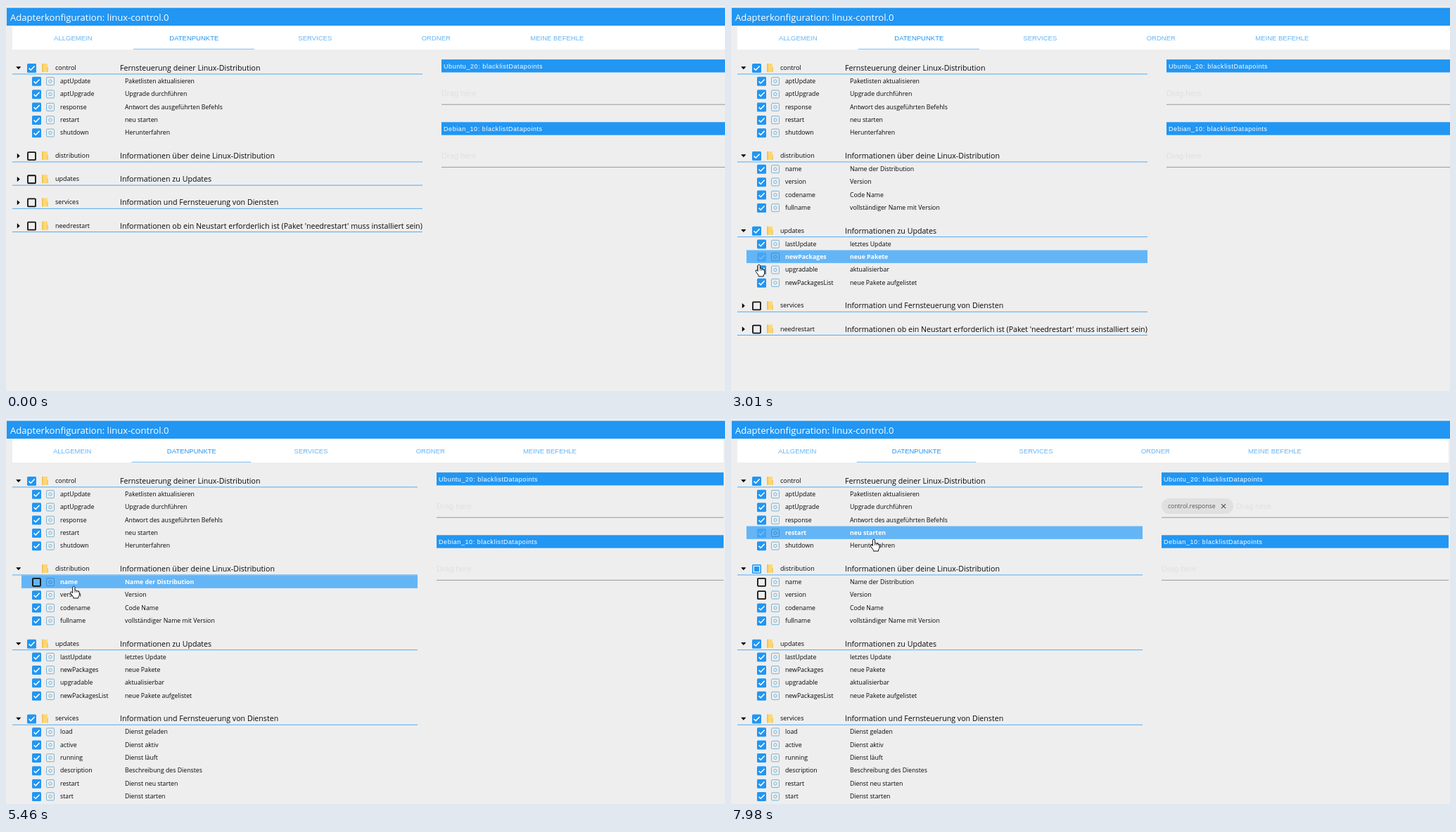
Animation of 1022 by 548 pixels, one loop 8000 ms. Source, as an HTML page with a canvas:

```html
<!DOCTYPE html>
<html lang="de">
<head>
<meta charset="utf-8">
<title>Adapterkonfiguration</title>
<style>
html, body { margin: 0; width: 100%; height: 100%; overflow: hidden; background: #eee; }
canvas { display: block; width: 1022px; height: 548px; }
</style>
</head>
<body>
<canvas id="stage"></canvas>
<script>
const W = 1022, H = 548, LOOP = 8000;
const BLUE = '#2196f3', LIGHT = '#64b5f6', INK = '#080808';
const SANS = '"Open Sans", "Noto Sans", sans-serif';
const ARIAL = '"Liberation Sans", Arial, sans-serif';
const ROW = 18.37, GROUP = 33.2, HALF = 9.4;
const PRESS = 70, LAG = 70, UNFOLD = 160;

const canvas = document.getElementById('stage');
const ctx = canvas.getContext('2d');
const dpr = window.devicePixelRatio || 1;
canvas.width = W * dpr;
canvas.height = H * dpr;

// checked: when a group is ticked; off: when a row is unticked
const groups = [
  { name: 'control', text: 'Fernsteuerung deiner Linux-Distribution', checked: -UNFOLD, rows: [
    ['aptUpdate', 'Paketlisten aktualisieren'], ['aptUpgrade', 'Upgrade durchführen'],
    ['response', 'Antwort des ausgeführten Befehls'], ['restart', 'neu starten'],
    ['shutdown', 'Herunterfahren']] },
  { name: 'distribution', text: 'Informationen über deine Linux-Distribution', checked: 1520, rows: [
    ['name', 'Name der Distribution', 5460], ['version', 'Version', 5940],
    ['codename', 'Code Name'], ['fullname', 'vollständiger Name mit Version']] },
  { name: 'updates', text: 'Informationen zu Updates', checked: 2540, rows: [
    ['lastUpdate', 'letztes Update'], ['newPackages', 'neue Pakete'],
    ['upgradable', 'aktualisierbar'], ['newPackagesList', 'neue Pakete aufgelistet']] },
  { name: 'services', text: 'Information und Fernsteuerung von Diensten', checked: 3620, rows: [
    ['load', 'Dienst geladen'], ['active', 'Dienst aktiv'], ['running', 'Dienst läuft'],
    ['description', 'Beschreibung des Dienstes'], ['restart', 'Dienst neu starten'],
    ['start', 'Dienst starten'], ['stop', 'Dienst stoppen']] },
  { name: 'needrestart', text: "Informationen ob ein Neustart erforderlich ist (Paket 'needrestart' muss installiert sein)",
    checked: Infinity, rows: [] }
].map(g => ({ ...g, rows: g.rows.map(([name, text, off = Infinity]) => ({ name, text, off })) }));

const toggles = groups.flatMap(g => [g.checked, ...g.rows.map(r => r.off)]);
const overflowAt = groups[3].checked + UNFOLD;
const drag = { start: 6650, end: 7500 };

// The pointer rests between moves; each visit starts at a point and makes moves to x, y
const visits = [
  { from: 120, to: 580, x: 876, y: 530, moves: [
    { t: 120, end: 580, x: 14, y: 240 }] },
  { from: 810, to: LOOP, x: 15, y: 211, moves: [
    { t: 1130, end: 1280, x: 37, y: 211 },
    { t: 1690, end: 2150, x: 57, y: 315 },
    { t: 2150, end: 2300, x: 42, y: 318 },
    { t: 2640, end: 3450, x: 37, y: 427 },
    { t: 3770, end: 4160, x: 44, y: 463 },
    { t: 4160, end: 4540, x: 48, y: 474 },
    { t: 4630, end: 5160, x: 97, y: 233 },
    { t: 5390, end: 5700, x: 94, y: 255 },
    { t: 6110, end: 6420, x: 98, y: 148 },
    { t: 6650, end: 6810, x: 188, y: 152 },
    { t: 6810, end: 7270, x: 660, y: 120 },
    { t: 7500, end: 7980, x: 203, y: 171 }] }
];

const hand = new Path2D('M-1.6 1.2Q0-.9 1.6 1.2V6Q3 5 4 6.5Q5.5 5.8 6.3 7.3Q8 6.8 8 8.8V12' +
  'Q8 14 6.5 15V17H-.5V15.5L-4 10.8Q-5.5 8.8-4.2 8Q-3 7.4-1.6 9.6Z');

const isDragging = t => t >= drag.start && t < drag.end;
const isPressed = t => isDragging(t) || toggles.some(c => t >= c - PRESS && t < c);

function pointerAt(t) {
  const visit = visits.find(v => t >= v.from && t < v.to);
  if (!visit) return null;
  let { x, y } = visit;
  for (const m of visit.moves) {
    const k = Math.min(1, Math.max(0, (t - m.t) / (m.end - m.t)));
    x += (m.x - x) * k;
    y += (m.y - y) * k;
  }
  return { x, y };
}

function rect(x, y, w, h, color) {
  ctx.fillStyle = color;
  ctx.fillRect(x, y, w, h);
}

function roundRect(x, y, w, h, r) {
  ctx.beginPath();
  ctx.roundRect(x, y, w, h, r);
}

function text(str, x, y, size, color, { bold = false, font = SANS, align = 'left', spacing = 0 } = {}) {
  ctx.font = `${bold ? 700 : 400} ${size}px ${font}`;
  ctx.letterSpacing = spacing + 'px';
  ctx.textAlign = align;
  ctx.fillStyle = color;
  ctx.fillText(str, x, y);
}

function trace(points) {
  ctx.beginPath();
  points.forEach(([x, y]) => ctx.lineTo(x, y));
}

function line(points, color, width) {
  trace(points);
  ctx.strokeStyle = color;
  ctx.lineWidth = width;
  ctx.stroke();
}

function arrow(x, y, open) {
  ctx.save();
  ctx.translate(x, y);
  if (open) ctx.rotate(Math.PI / 2);
  trace([[-2, -3.6], [2, 0], [-2, 3.6]]);
  ctx.fillStyle = '#000';
  ctx.fill();
  ctx.restore();
}

// state: 'on', 'off', 'part' or 'none'
function checkbox(x, y, state, hot) {
  if (state === 'none') return;
  if (state === 'off') {
    roundRect(x + 1, y - 5, 11, 11, 1);
    ctx.strokeStyle = '#111';
    ctx.lineWidth = 1.8;
    ctx.stroke();
    return;
  }
  roundRect(x, y - 6, 13, 13, 1.5);
  ctx.fillStyle = hot ? '#43a5f4' : BLUE;
  ctx.fill();
  if (state === 'part') {
    ctx.strokeStyle = '#fff';
    ctx.lineWidth = 1.2;
    ctx.strokeRect(x + 2.2, y - 3.8, 8.6, 8.6);
  } else {
    line([[x + 2.6, y + .6], [x + 5.2, y + 3.2], [x + 10.6, y - 2.4]], hot ? '#78bdf7' : '#fff', 1.5);
  }
}

function folder(y) {
  rect(51, y - 6, 8, 12, '#ffd873');
  rect(51, y - 6, 2, 12, '#f2c55c');
  rect(58, y - 1, 2, 7, '#f7cd66');
}

function stateIcon(x, y, hot) {
  ctx.strokeStyle = hot ? '#3f8fce' : '#78b4d8';
  ctx.lineWidth = 1;
  roundRect(x + .5, y - 5.2, 11, 11, 1.5);
  ctx.stroke();
  ctx.beginPath();
  ctx.arc(x + 6, y + .3, 2.2, 0, 7);
  ctx.stroke();
}

function groupState(g, t) {
  if (t < g.checked) return 'off';
  const changed = Math.min(...g.rows.map(r => r.off));
  if (t < changed) return 'on';
  return t < changed + PRESS ? 'none' : 'part';
}

function drawTree(t, right) {
  const p = pointerAt(isDragging(t) ? drag.start : t - LAG);

  // Fills the row if the pointer is on it and returns its text style
  function highlight(left, y) {
    const hot = !!p && p.x >= left && p.x < right && Math.abs(p.y - y) < HALF;
    if (hot) rect(left, y - HALF, right - left, 2 * HALF - .4, LIGHT);
    return { hot, ink: hot ? '#fff' : INK, style: { bold: hot } };
  }

  let y = 88;
  for (const g of groups) {
    const open = t >= g.checked + UNFOLD;
    const { hot, ink, style } = highlight(9, y);
    rect(9, y + HALF - 1, right - 9, 1, '#55acf2');
    arrow(17.8, y + .3, open);
    checkbox(30, y, groupState(g, t), hot);
    folder(y);
    text(g.name, 70, y + 3, 9, ink, style);
    text(g.text, 162, y + 4, 10.65, ink, style);
    if (open) {
      g.rows.forEach((row, i) => {
        const ry = y + 18.8 + i * ROW;
        const { hot, ink, style } = highlight(22, ry);
        checkbox(37, ry, t < row.off ? 'on' : 'off', hot);
        stateIcon(57, ry, hot);
        text(row.name, 77, ry + 3, 8.75, ink, style);
        text(row.text, 169, ry + 3, 8.75, ink, style);
      });
      y += g.rows.length * ROW;
    }
    y += GROUP;
  }
}

function drawTabs(right, step) {
  rect(9, 28, right - 9, 34, '#fff');
  ['ALLGEMEIN', 'DATENPUNKTE', 'SERVICES', 'ORDNER', 'MEINE BEFEHLE'].forEach((name, i) =>
    text(name, 9.3 + step * (i + .5), 48.5, 9.5, i === 1 ? BLUE : LIGHT, { font: ARIAL, align: 'center' }));
  rect(9 + step, 60.8, step, 1.2, '#8cc8f8');
}

function drawTarget(title, x, y, right, chip) {
  rect(x, y, right - x, 18.4, BLUE);
  text(title, x + 3, y + 13, 9, '#fff', { font: ARIAL, spacing: .57 });
  text('Drag here', x + (chip ? 106 : 0), y + 51.5, 11.2, '#e0e0e0', { font: ARIAL });
  rect(x, y + 63.6, right - x, 1, '#999');
  if (!chip) return;
  roundRect(x, y + 37, 102, 22, 11);
  ctx.fillStyle = '#e0e0e0';
  ctx.fill();
  text(chip, x + 9, y + 51, 8.6, '#555');
  const cx = x + 88, cy = y + 48;
  for (const s of [-3, 3]) line([[cx - 3, cy - s], [cx + 3, cy + s]], '#555', 1.2);
}

function drawGhost(x, y) {
  rect(x, y, 176, 17, 'rgba(100,181,246,.8)');
  stateIcon(x + 2, y + 8.5, true);
  text('control.response', x + 22, y + 12, 8.75, '#fff', { bold: true });
}

function drawPointer(t) {
  const p = pointerAt(t);
  if (!p) return;
  if (isDragging(t)) drawGhost(p.x + 8, p.y + 8);
  ctx.save();
  ctx.translate(p.x, p.y);
  if (isPressed(t)) {
    ctx.beginPath();
    ctx.arc(0, 1, 8.5, 0, 7);
    ctx.fillStyle = 'rgba(214,224,50,.7)';
    ctx.fill();
  }
  ctx.fillStyle = '#fff';
  ctx.fill(hand);
  ctx.strokeStyle = '#111';
  ctx.lineWidth = 1;
  ctx.stroke(hand);
  for (const x of [1.6, 4, 6.3]) line([[x, 6.5], [x, 8.8]], '#111', .8);
  ctx.restore();
}

function draw(t) {
  const narrow = t >= overflowAt;
  const right = narrow ? 1020 : W;
  const x = narrow ? 612 : 619;
  ctx.setTransform(dpr, 0, 0, dpr, 0, 0);
  rect(0, 0, W, H, '#eee');
  rect(1, 2.6, W - 1, 25.4, BLUE);
  text('Adapterkonfiguration: linux-control.0', 6, 21, 13.1, '#fff');
  drawTabs(right, narrow ? 169.7 : 172);
  drawTree(t, narrow ? 585 : 592);
  drawTarget('Ubuntu_20: blacklistDatapoints', x, 76.1, right, t >= drag.end && 'control.response');
  drawTarget('Debian_10: blacklistDatapoints', x, 165.3, right);
  drawPointer(t);
}

const start = performance.now();
function tick() {
  draw((performance.now() - start) % LOOP);
  requestAnimationFrame(tick);
}
tick();
</script>
</body>
</html>
```
